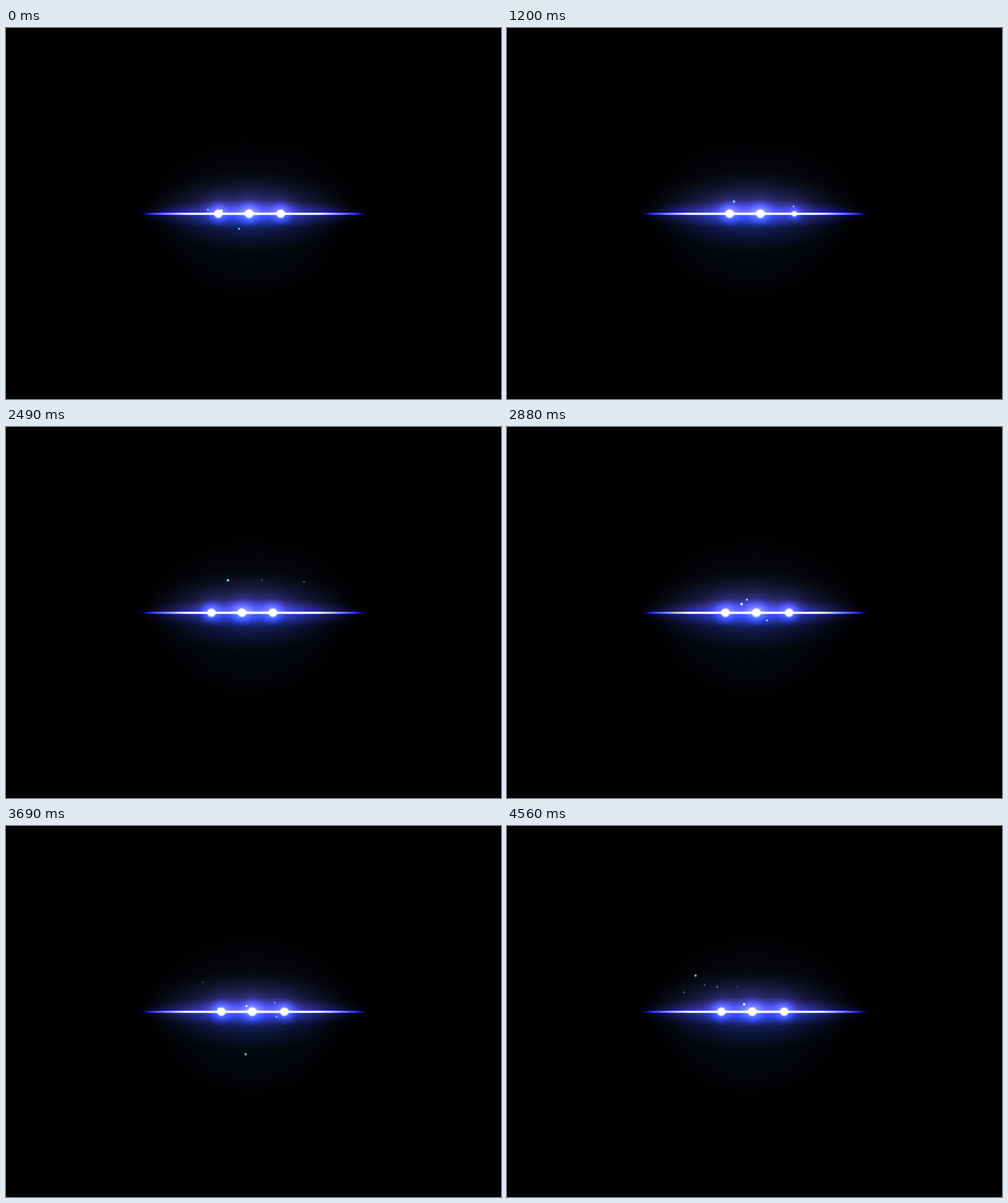
Recreate the animation shown at these times as an HTML page with a canvas. Size 800 by 600 pixels, loop 4590 ms.

```html
<!DOCTYPE html>
<html lang="en">
<head>
<meta charset="utf-8">
<title>Light bar</title>
<style>
  html, body { margin: 0; width: 100%; height: 100%; overflow: hidden; background: #000; }
  canvas { display: block; }
</style>
</head>
<body>
<canvas id="stage" width="800" height="600"></canvas>
<script>
const ctx = document.getElementById('stage').getContext('2d');
const LOOP = 4590, STEP = 30, CYCLE = 900, SPACING = 50;
const LINE_Y = 300.5, LEFT = 220, WIDTH = 360;
const clamp = v => Math.max(0, Math.min(1, v));

// Elliptical glow whose alpha is gain * (1 - r)^power, capped at 1.
function glow(x, y, rx, ry, rgb, gain, power) {
  ctx.save();
  ctx.translate(x, y);
  ctx.scale(rx, ry);
  const g = ctx.createRadialGradient(0, 0, 0, 0, 0, 1);
  for (let r = 0; r <= 10; r++) {
    g.addColorStop(r / 10, `rgba(${rgb},${clamp(gain * (1 - r / 10) ** power)})`);
  }
  ctx.fillStyle = g;
  ctx.fillRect(-1, -1, 2, 2);
  ctx.restore();
}

function clipHalf(top, draw) {
  ctx.save();
  ctx.beginPath();
  ctx.rect(0, top ? 0 : LINE_Y, 800, top ? LINE_Y : 300);
  ctx.clip();
  draw();
  ctx.restore();
}

// Lights travel right one spacing per cycle, appearing at the left and vanishing at the right.
function beadsAt(t) {
  const phase = (t / CYCLE + 10.3) % 1, beads = [];
  for (let n = -1; n < 3; n++) {
    const a = phase + n;
    const size = clamp((a + 0.2) / 0.18) * clamp((2.85 - a) / 0.3);
    if (size > 0) {
      const rush = 12 * Math.max(0, a - 2) ** 2;
      beads.push({
        x: Math.max(332, 328 + SPACING * a + rush),
        y: LINE_Y + 2 * clamp(1 - a / 0.06),
        size
      });
    }
  }
  return beads;
}

let seed = 41;
const rand = () => (seed = (seed * 16807) % 2147483647) / 2147483647;

// Each spark leaves a random light, mostly upwards, and burns out.
const sparks = Array.from({ length: 58 }, () => {
  const life = 280 + rand() * 240;
  const born = rand() * (LOOP + life) - life;
  const beads = beadsAt(born);
  const angle = (rand() - 0.5) * 2;
  const speed = 0.07 + 0.33 * rand() ** 2;
  const rise = rand() < 0.2 ? 0.6 : -1;
  return {
    born, life,
    x: beads[Math.floor(rand() * beads.length)].x,
    vx: Math.sin(angle) * speed,
    vy: Math.cos(angle) * speed * rise,
    radius: 1.4 + rand() * 1.6
  };
});

function drawSparks(t) {
  for (const s of sparks) {
    const age = t - s.born;
    if (age < 0 || age > s.life) continue;
    const fade = clamp(2.2 * (1 - age / s.life));
    glow(s.x + s.vx * age, LINE_Y + s.vy * age, s.radius, s.radius,
         '105,190,230', 2 * fade * s.radius / 3, 1);
  }
}

function drawAmbient() {
  clipHalf(true, () => {
    glow(400, LINE_Y, 185, 135, '8,11,20', 1, 0.8);
    glow(393, LINE_Y, 185, 72, '72,68,190', 0.85, 1.5);
  });
  clipHalf(false, () => {
    glow(393, LINE_Y, 165, 145, '7,13,24', 1, 0.8);
    glow(393, LINE_Y, 185, 66, '28,48,165', 0.85, 1.6);
  });
  glow(398, LINE_Y, 190, 24, '62,66,245', 0.75, 1.2);
}

function drawBar() {
  const core = ctx.createLinearGradient(LEFT, 0, LEFT + WIDTH, 0);
  const edge = ctx.createLinearGradient(LEFT, 0, LEFT + WIDTH, 0);
  for (let i = 0; i <= 20; i++) {
    const s = Math.sin(Math.PI * i / 20);
    const pale = 255 * clamp(1.15 * s);
    core.addColorStop(i / 20, `rgba(${pale},${pale},${255 * clamp(0.45 + 2.5 * s)},${clamp(0.5 + 3 * s)})`);
    edge.addColorStop(i / 20, `rgba(${70 * s},${70 * s},255,${0.85 * clamp(2 * s)})`);
  }
  ctx.fillStyle = edge;
  ctx.fillRect(LEFT, LINE_Y - 2.5, WIDTH, 5);
  ctx.fillStyle = core;
  ctx.fillRect(LEFT, LINE_Y - 1.5, WIDTH, 3);
}

function drawBead({ x, y, size }) {
  clipHalf(true, () => glow(x, y, 34, 44, '65,65,190', 0.3 * size, 1.5));
  glow(x, y, 24 * size, 24 * size, '70,85,255', 0.85 * size, 1.7);
  glow(x, y, 8.5 * size, 8.5 * size, '255,255,255', 2 * size, 1.3);
}

function draw(t) {
  ctx.globalCompositeOperation = 'source-over';
  ctx.fillStyle = '#000';
  ctx.fillRect(0, 0, 800, 600);
  ctx.globalCompositeOperation = 'lighter';
  drawAmbient();
  drawBar();
  beadsAt(t).forEach(drawBead);
  drawSparks(t);
}

const start = performance.now();
function frame() {
  const t = (performance.now() - start) % LOOP;
  draw(Math.floor(t / STEP) * STEP);
  requestAnimationFrame(frame);
}
frame();
</script>
</body>
</html>
```
